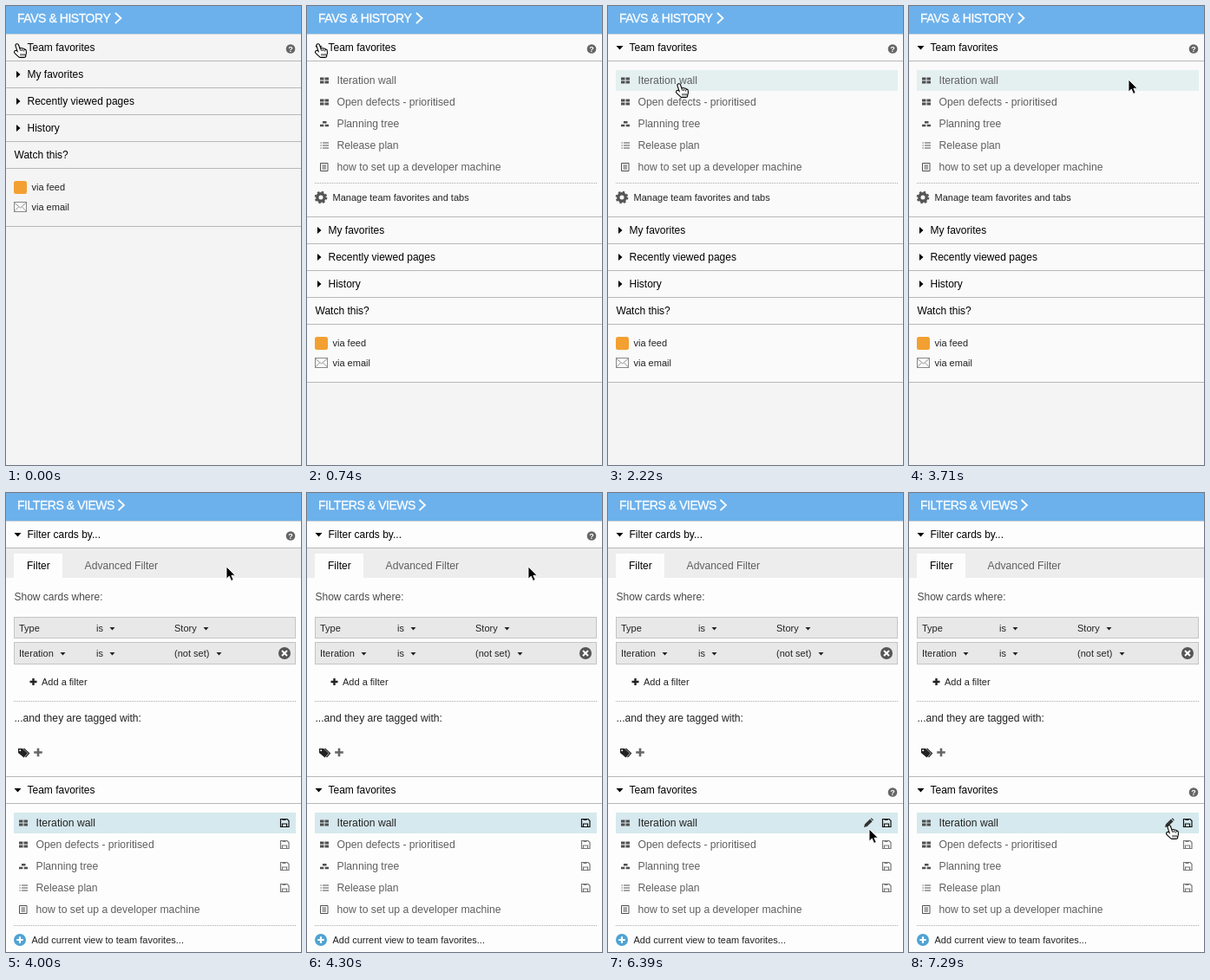
These frames come from a looping animation (340 px wide and 530 px high, 8 s). An HTML page:

```html
<!DOCTYPE html>
<html lang="en">
<head>
<meta charset="utf-8">
<title>Favorites panel</title>
<style>
html, body { margin: 0; width: 100%; height: 100%; overflow: hidden; background: #f4f4f4; }
svg { display: block; width: 340px; height: 530px; }
text { font-family: "Liberation Sans", Helvetica, Arial, sans-serif; white-space: pre; }
</style>
</head>
<body>
<svg id="stage" viewBox="0 0 340 530" xmlns="http://www.w3.org/2000/svg"></svg>
<script>
const LOOP = 8000, OPEN_AT = 740, FILTERS_AT = 3860, STEP = 148;
const LEFT = 9.5, LABEL = 24.5, SMALL_LABEL = 29.5, ROW_LABEL = 34.5;
const PITCH = 31, ROW_PITCH = 25, OPEN_SHIFT = 180;
const BLUE = '#6cb1ec', RULE = '#b8b8b8', GREY = '#5f5f5f', DARK = '#222', PAPER = '#fdfdfd';

// Pointer journeys: each glides in short steps to its end point, then rests.
const speedUp = u => u ** 3;
const slowDown = u => 1 - (1 - u) ** 4;
const smooth = u => u * u * (3 - 2 * u);
const START = { x: 13, y: 44 };
const MOVES = [
  { from: 1190, to: 1930, x: 76, y: 90, ease: smooth },
  { from: 2220, to: 2520, x: 231, y: 88, ease: speedUp },
  { from: 3270, to: 4000, x: 254, y: 85, ease: slowDown },
  { from: 4300, to: 4450, x: 258, y: 85, ease: speedUp },
  { from: 5050, to: 5640, x: 300, y: 384, ease: smooth },
  { from: 6090, to: 6690, x: 304, y: 404, ease: speedUp },
  { from: 7140, to: 7290, x: 300, y: 384, ease: smooth }
];

function pointer(t) {
  let { x, y } = START;
  for (const m of MOVES) {
    if (t < m.from) break;
    const count = Math.round((m.to - m.from) / STEP) + 1;
    const done = t >= m.to ? count : Math.floor((t - m.from) / STEP) + 1;
    const u = m.ease(Math.min(1, done / count));
    x += (m.x - x) * u;
    y += (m.y - y) * u;
  }
  return { x, y };
}

// Drawing helpers
const rect = (x, y, w, h, fill, extra = '') =>
  `<rect x="${x}" y="${y}" width="${w}" height="${h}" fill="${fill}" ${extra}/>`;
const path = (d, fill, extra = '') => `<path d="${d}" fill="${fill}" ${extra}/>`;
const line = (d, color, width = 1, extra = '') =>
  path(d, 'none', `stroke="${color}" stroke-width="${width}" ${extra}`);
const dot = (x, y, r, fill) => `<circle cx="${x}" cy="${y}" r="${r}" fill="${fill}"/>`;
const text = (s, x, y, size = 12, fill = '#000', extra = '') =>
  `<text x="${x}" y="${y}" font-size="${size}" fill="${fill}" ${extra}>${s.replace('&', '&amp;')}</text>`;
const small = (s, x, y) => text(s, x, y, 11, DARK);
const group = (id, body, x = 0, y = 0) =>
  `<g${id ? ` id="${id}"` : ''} transform="translate(${x} ${y})">${body}</g>`;

const rule = y => rect(0, y, 340, 1, RULE);
const dots = y => line(`M9 ${y}.5H334`, '#aaa', 1, 'stroke-dasharray="1 1"');
const right = y => path(`M12 ${y - 4}l4.5 4-4.5 4z`, '#000');
const down = y => path(`M9.5 ${y - 2}h8l-4 4.5z`, '#000');
const caret = (x, y) => path(`M${x - 3} ${y - 1}h6l-3 3.5z`, DARK);
const plus = (x, y, r, color, w) => line(`M${x - r} ${y}h${2 * r}M${x} ${y - r}v${2 * r}`, color, w);
const help = (id, y) => group(id,
  dot(328, y, 5.3, '#666') + text('?', 328, y + 3.3, 9, '#fff', 'font-weight="bold" text-anchor="middle"'));
const section = (label, y, mark = right) => mark(y) + text(label, LABEL, y + 4);

const header = (label, x) => rect(0, 0, 340, 32, BLUE) + rect(0, 32, 340, 1, '#ccd3d9') +
  text(label, 13, 19, 14, '#fff', 'letter-spacing="-.45" stroke="#fff" stroke-width=".3"') +
  line(`M${x} 8l6.5 6-6.5 6`, '#fff', 1.8);

// Row icons, centred on (20, 0)
const ICONS = {
  grid: c => path('M15-3.5h4.5v3H15zm5.5 0H25v3h-4.5zM15 .5h4.5v3H15zm5.5 0H25v3h-4.5z', c),
  tree: c => path('M18-3h4.5v2.5H18zM15 .7h4.3v2.5H15zm5.7 0H25v2.5h-4.3z', c),
  list: c => line('M15.5-3h9.5M15.5 0h9.5M15.5 3h9.5', c, 1.2, 'stroke-dasharray="1.3 1.2 7"'),
  page: c => line('M15.5-4.5H24v9h-8.5zM17.5-2H22M17.5 0H22M17.5 2H22', c)
};
const ROWS = {
  'Iteration wall': 'grid', 'Open defects - prioritised': 'grid', 'Planning tree': 'tree',
  'Release plan': 'list', 'how to set up a developer machine': 'page'
};
const rows = (y, firstColor) => Object.entries(ROWS).map(([label, icon], i) =>
  group('', ICONS[icon]('#505050') + text(label, ROW_LABEL, 4, 12.2, i ? GREY : firstColor), 0, y + ROW_PITCH * i)
).join('');
const highlight = (y, fill, id) => rect(9, y - 12, 325, 24, fill, id ? `id="${id}"` : '');

const floppy = (y, c) => group('',
  line('M-4.5-4.5h7.5l2 2v7h-9.5z', c, 1.2) + line('M-2.5-3.5h4M-2.5 4V1h5v3', c, 1.2), 321, y);
const pencil = (id, y) => group(id,
  path('M-5 5l.9-3.6L2-4.4 4.6-1.8-1.4 4.1zM2.7-5l1-.7 2.2 2.2-.8 1.1z', '#333'), 300, y);
const gear = (x, y) => group('',
  '<circle r="4.2" fill="none" stroke="#555" stroke-width="3.4"/>' +
  '<circle r="6.3" fill="none" stroke="#555" stroke-width="2" stroke-dasharray="2.5 2.448"/>', x, y);
const envelope = (x, y) => group('',
  rect(0, 0, 14, 11, '#fafafa', 'stroke="#888"') + line('M0 .5l7 6 7-6M0 10.5l5-5M14 10.5l-5-5', '#888', .9), x, y);

// Favorites page
const closedSections = ['My favorites', 'Recently viewed pages', 'History']
  .map((label, i) => rule(63 + PITCH * i) + section(label, 79 + PITCH * i)).join('');
const tail = closedSections + rule(156) + text('Watch this?', LEFT, 176) + rule(187) +
  rect(9, 202, 15, 15, '#f3a032', 'rx="2.5"') + small('via feed', SMALL_LABEL, 213) +
  envelope(9.5, 226.5) + small('via email', SMALL_LABEL, 236) + rule(254);

const favsPage = header('FAVS & HISTORY', 126) +
  group('closedMark', right(48)) +
  group('openList',
    rect(0, 33, 340, 401, '#fafafa') + down(48) + rule(63) + highlight(86, '#e4f0f0', 'favHover') +
    rows(86, GREY) + dots(204) + gear(16, 221) + small('Manage team favorites and tabs', SMALL_LABEL, 225)) +
  text('Team favorites', LABEL, 52) + group('tail', tail) + help('', 49.5);

// Filters page
const condition = (y, h, name, value) =>
  rect(9.5, y - 12.5, 324, h, '#e8e8e8', 'stroke="#c4c4c4"') +
  small(name, 15, y + 3.5) + small('is', 104, y + 3.5) + small(value, 194, y + 3.5) + caret(122.5, y);
const tag = path('M14 295h5l6 5.5-4.5 5L14 300z', DARK) +
  line('M20.5 295l6 5.5-4 4.5', DARK, 1.2) + dot(16.2, 297.2, 1, PAPER);

const filtersPage = rect(0, 0, 340, 530, PAPER) + header('FILTERS & VIEWS', 129.5) +
  section('Filter cards by...', 48, down) + rule(63) + help('helpTop', 49.5) +
  rect(0, 64, 340, 34, '#ededed') + rect(9, 70, 56, 28, PAPER) +
  text('Filter', 24, 88) + text('Advanced Filter', 90.5, 88, 12.2, GREY) +
  text('Show cards where:', LEFT, 124, 12, '#4a4a4a') +
  condition(156, 24, 'Type', 'Story') + caret(230.5, 156) +
  condition(185, 25, 'Iteration', '(not set)') + caret(65.5, 185) + caret(245.5, 185) +
  dot(321, 185, 7, '#555') + line('M318 182l6 6M324 182l-6 6', '#fff', 2) +
  plus(31.5, 218, 4, DARK, 2.4) + small('Add a filter', 41, 222) + dots(240) +
  text('...and they are tagged with:', LEFT, 264, 12.15, DARK) +
  tag + plus(37, 299.5, 4.8, '#666', 2.6) +
  rule(327) + section('Team favorites', 343, down) + rule(358) + help('helpFav', 345.5) +
  highlight(381, '#d6e9ee') + highlight(406, '#e4f0f0', 'viewHover') + rows(381, DARK) +
  [0, 1, 2, 3].map(i => floppy(381 + ROW_PITCH * i, i ? '#777' : '#111')).join('') +
  pencil('pencil1', 381) + pencil('pencil2', 406) + dots(499) +
  dot(16, 516, 7, '#4fa3d3') + plus(16, 516, 3.7, '#fff', 2.2) +
  small('Add current view to team favorites...', SMALL_LABEL, 520);

// Pointers: the hand is one set of round strokes, drawn thick in black and thinner in white
const bones = 'M3.8 2.6L6.6 11M8.4 7.3V12M10.5 7.8V12M12.5 9v3M2.4 10.2L7 14.5H12M7 12.5h5';
const stroke = (color, width) => line(bones, color, width, 'stroke-linecap="round" stroke-linejoin="round"');
const hand = stroke('#000', 4.8) + stroke('#fff', 2.6) + line('M7.5 6.5l.4 2.5M9.6 7v2M11.6 7.8v1.7M8 12v2.5M10 12v2.5M12 12v2.5', '#000', .9);
const arrow = path('M0 0V14.2L3.3 11.1 5.6 16.4 8.2 15.3 5.9 10.2H10.3Z', '#000', 'stroke="#fff" stroke-width=".9"');

const stage = document.getElementById('stage');
stage.innerHTML = rect(0, 0, 340, 530, '#f4f4f4') +
  group('favs', favsPage) + group('filters', filtersPage) +
  group('cursor', group('hand', hand, -4, -1) + group('arrow', arrow));

const el = {};
stage.querySelectorAll('[id]').forEach(node => { el[node.id] = node; });
const show = (id, on) => el[id].setAttribute('display', on ? 'inline' : 'none');
const move = (id, x, y) => el[id].setAttribute('transform', `translate(${x} ${y})`);
const near = (v, centre, reach) => Math.abs(v - centre) < reach;

function draw(t) {
  const { x, y } = pointer(t);
  const open = t >= OPEN_AT, filters = t >= FILTERS_AT;
  const onRow1 = near(y, 381, 12.5), onRow2 = near(y, 406, 12.5);

  show('favs', !filters);
  show('closedMark', !open);
  show('openList', open);
  show('favHover', near(y, 86, 12));
  move('tail', 0, open ? OPEN_SHIFT : 0);

  show('filters', filters);
  show('helpTop', y < 90);
  show('helpFav', y > 328);
  show('pencil1', onRow1);
  show('pencil2', onRow2);
  show('viewHover', onRow2);

  const onLink = filters
    ? near(x, 300, 6) && (near(y, 381, 6) || near(y, 406, 6))
    : x < 102 && (near(y, 48, 15) || (x > 34 && near(y, 86, 12)));
  move('cursor', Math.round(x), Math.round(y));
  show('hand', onLink);
  show('arrow', !onLink);
}

const start = performance.now();
function tick() {
  draw((performance.now() - start) % LOOP);
  requestAnimationFrame(tick);
}
draw(0);
requestAnimationFrame(tick);
</script>
</body>
</html>
```
